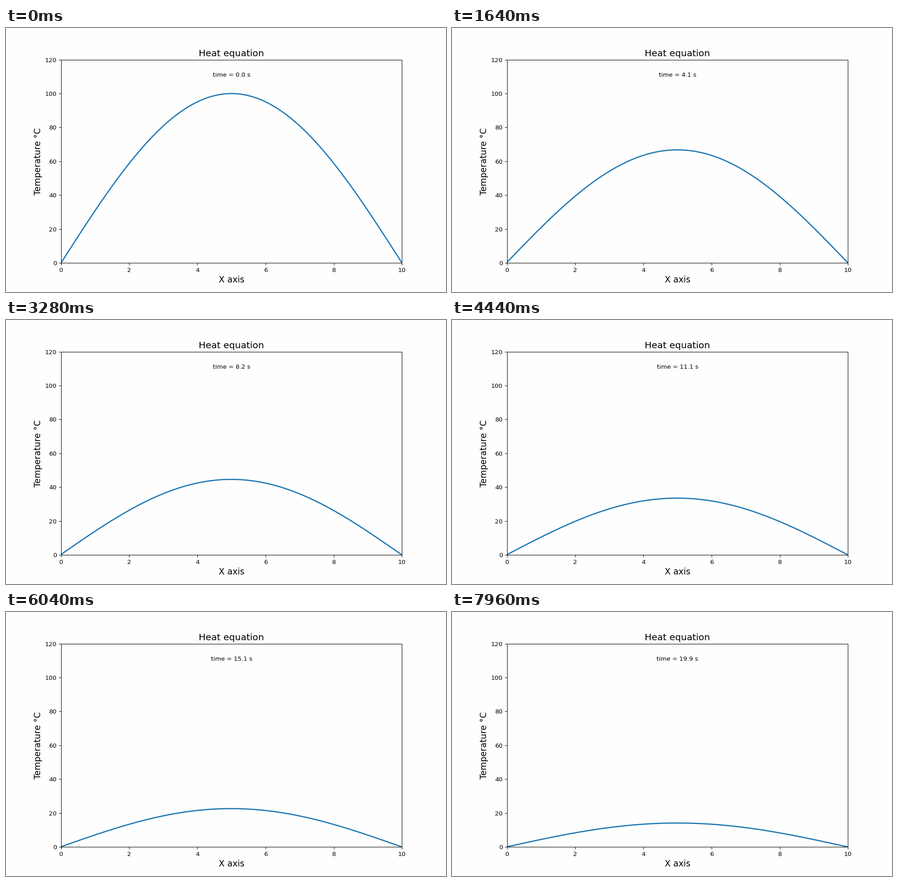
Recreate the animation shown at these times as a matplotlib script. Size 966 px wide and 580 px high, loop 8000 ms.

```python
import numpy as np
import matplotlib.pyplot as plt
from matplotlib.animation import FuncAnimation

LENGTH = 10.0        # rod length
PEAK = 100.0         # initial temperature at the middle
DIFFUSIVITY = 1.0
CELLS = 500
DT = 0.1             # simulated seconds per frame
FRAMES = 200
INTERVAL = 40

plt.rcParams["font.family"] = "DejaVu Sans"

x = np.linspace(0, LENGTH, CELLS + 1)
dx = LENGTH / CELLS
start = PEAK * np.sin(np.pi * x / LENGTH)

# The cold walls sit one cell left of the first node and on the last node.
nodes = np.arange(1, CELLS + 2)
modes = np.arange(1, CELLS + 1)
angle = np.pi / (CELLS + 1)
basis = np.sin(angle * np.outer(nodes, modes))
weights = 2 / (CELLS + 1) * basis.T @ start
rates = DIFFUSIVITY * (2 / dx * np.sin(angle * modes / 2)) ** 2


def temperature(t):
    """Heat equation solved as a sum of decaying sine modes."""
    return basis @ (weights * np.exp(-rates * t))


fig, ax = plt.subplots(figsize=(10, 6.0042), dpi=96.6, facecolor="#fefefe")
ax.set_facecolor("#fefefe")
ax.set_xlim(0, LENGTH)
ax.set_ylim(0, 120)
ax.set_title("Heat equation", fontsize=15)
ax.set_xlabel("X axis", fontsize=14)
ax.set_ylabel("Temperature °C", fontsize=14)

curve, = ax.plot(x, start, color="C0", lw=2)
clock = ax.text(LENGTH / 2, 110, "time = 0.0 s", ha="center", fontsize=10)


def update(i):
    t = i * DT
    curve.set_ydata(temperature(t))
    clock.set_text(f"time = {t:.1f} s")
    return curve, clock


anim = FuncAnimation(fig, update, frames=FRAMES, interval=INTERVAL,
                     repeat=True, repeat_delay=0)

plt.show()
```
